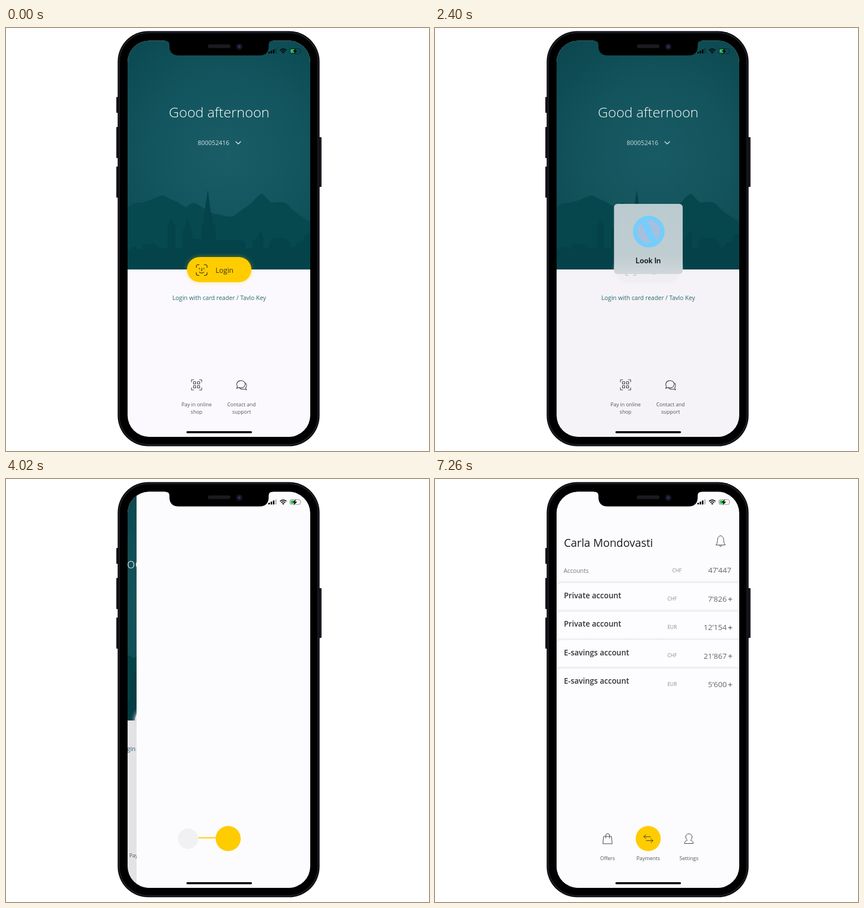
These frames come from a looping animation (748 px wide and 748 px high, 7.5 s). An HTML page:

```html
<!DOCTYPE html>
<html lang="en">
<head>
<meta charset="utf-8">
<title>Banking app login</title>
<style>
  html, body { margin: 0; width: 100%; height: 100%; overflow: hidden; background: #fff; }
  svg { display: block; width: 100vw; height: 100vh; }
  text { font-family: "Open Sans", "Noto Sans", sans-serif; }
  .mid { text-anchor: middle; }
  .end { text-anchor: end; }
  .line { fill: none; stroke: #444; stroke-linecap: round; stroke-linejoin: round; }
  .small { font-size: 9px; fill: #555; }
  .sum { font-size: 13.5px; fill: #666; }
  .cur { font-size: 8.7px; fill: #888; }
</style>
</head>
<body>
<svg viewBox="0 0 748 748" xmlns="http://www.w3.org/2000/svg">
  <defs>
    <clipPath id="screen"><rect x="215" y="22.500" width="323" height="700.500" rx="38"/></clipPath>
    <radialGradient id="sky" gradientUnits="userSpaceOnUse" cx="390" cy="225" r="270">
      <stop offset="0" stop-color="#1a5d66"/><stop offset=".5" stop-color="#13555e"/><stop offset="1" stop-color="#0a4850"/>
    </radialGradient>
    <linearGradient id="edge" x2="0" y2="1">
      <stop offset="0" stop-color="#dedddf" stop-opacity="0"/><stop offset="1" stop-color="#dedddf"/>
    </linearGradient>
    <linearGradient id="glass" x2="0" y2="1">
      <stop offset="0" stop-color="#bacbcf"/><stop offset=".75" stop-color="#bfcdd1"/><stop offset="1" stop-color="#d0d7da"/>
    </linearGradient>
    <filter id="blur" x="-20%" y="-40%" width="140%" height="180%"><feGaussianBlur stdDeviation="3.5"/></filter>
    <g id="face">
      <path d="M-9.5-4.5v-2a3 3 0 0 1 3-3h2M4.500-9.500h2a3 3 0 0 1 3 3v2M9.500 4.500v2a3 3 0 0 1-3 3h-2M-4.500 9.500h-2a3 3 0 0 1-3-3v-2"/>
      <path d="M-4-3.500v1.700M4-3.500v1.700M.4-3.500v4.300h-1.200M-4 3.600q4 3.600 8 0"/>
    </g>
  </defs>

  <g fill="#1d1d25">
    <rect x="195" y="122" width="5" height="28" rx="1"/>
    <rect x="195" y="175" width="5" height="55" rx="1"/>
    <rect x="195" y="245" width="5" height="55" rx="1"/>
    <rect x="552" y="193" width="6" height="88" rx="1"/>
  </g>
  <rect x="197.500" y="5.500" width="357" height="734" rx="54"/>
  <rect x="200" y="8" width="352" height="729" rx="51.500" fill="none" stroke="#1d1d26" stroke-width="2.500"/>

  <g clip-path="url(#screen)">
    <g id="login">
      <rect x="215" y="22" width="323" height="701" fill="#fbf9fd"/>
      <rect x="215" y="22" width="323" height="405" fill="url(#sky)"/>
      <path fill="#06494f" d="M215 318Q224 308 236 309Q246 308 258 303Q270 297 278 296Q288 302 300 306Q310 313 319 317Q327 309 333 309Q342 314 352 320Q366 330 378 330Q392 335 402 333Q416 322 435 309Q446 294 453 293Q461 301 469 309Q480 307 490 308Q498 310 504 319Q520 333 538 342V427H215Z"/>
      <path fill="#04434a" d="M215 391H222V387H231V391H240V386L248 381H262L270 387V390H286V348L289 345L292 338L295 345L299 348V390H312V361L316 352L321 337L326 352L330 361V373H345V350L349 345L352 318L357 286L361 318L366 345L371 350V375H418L424 380V389H436V378L445 371L450 357L455 371V389H466V379L473 372H494L503 380V388H510L516 378H524L528 366L538 363V427H215Z"/>
      <text class="mid" x="377" y="158" font-size="24.700" font-weight="350" fill="#fff">Good afternoon</text>
      <text x="339" y="207" font-size="10.900" fill="#d5e2e4">800052416</text>
      <path class="line" style="stroke:#e4eeee" stroke-width="1.300" d="M406.500 201l4.200 4 4.200-4"/>
      <rect id="glow" x="319" y="403.500" width="116" height="47" rx="23.500" filter="url(#blur)"/>
      <rect id="button" x="320" y="405" width="114" height="44.500" rx="22.200"/>
      <g id="label">
        <use href="#face" class="line" style="stroke:#3b3108" stroke-width="1.200" x="346" y="428"/>
        <text x="370.500" y="432.500" font-size="12.500" fill="#3b3420">Login</text>
      </g>
      <text class="mid" x="377" y="480.500" font-size="10.600" fill="#2b6a72">Login with card reader / Tavlo Key</text>
      <g class="line" stroke-width="1.100" transform="translate(337 631)">
        <path d="M-9-5v-4h4M5-9h4v4M9 5v4h-4M-5 9h-4v-4"/>
        <path d="M-5.500-5.500h4v4h-4ZM1.500-5.500h4v4h-4ZM-5.500 1.500h4v4h-4ZM1.500 1.500h4v4h-4Z"/>
      </g>
      <g class="line" stroke-width="1.100" transform="translate(417 631)">
        <path d="M-5.500 4.500L-9 6.500L-7.800 2.500A7.500 6.500 0 1 1-5.500 4.500Q-3 6 1 5"/>
        <path d="M7-3A7 6.500 0 0 1 6.500 5.500L8.500 8.800L3.500 7.500Q-1 8.800-4 5.800"/>
      </g>
      <g class="small mid">
        <text x="337" y="669">Pay in online</text><text x="337" y="682">shop</text>
        <text x="416.500" y="669">Contact and</text><text x="416.500" y="682">support</text>
      </g>
    </g>
    <rect id="dim" x="215" y="22" width="323" height="701"/>

    <g id="popup">
      <rect x="316.500" y="311" width="121.500" height="124" rx="6" fill="url(#glass)"/>
      <g fill="none" stroke="#76cdf9" stroke-linecap="round">
        <use id="scanFace" href="#face" transform="translate(378 360) scale(2.800)" stroke-width="1.200"/>
        <g id="rings" stroke-width="8">
          <circle cx="378" cy="360" r="24" fill="#a7bfde"/>
          <ellipse id="ring" cx="378" cy="360" ry="24"/>
        </g>
        <g id="tick" stroke-width="3.500">
          <circle cx="378" cy="360" r="26"/><path d="M366 361l8 8 16-18" stroke-linejoin="round"/>
        </g>
      </g>
      <text class="mid" x="377" y="416" style="font-family:Inter,sans-serif" font-size="12.800" font-weight="600" fill="#101416">Look In</text>
    </g>

    <g id="home">
      <rect x="215" y="22" width="324" height="701" fill="#fcfbfd"/>
      <g id="head">
        <text x="228" y="119.500" font-size="19.400" font-weight="400" fill="#1c1c1c">Carla Mondovasti</text>
        <path class="line" stroke-width="1" d="M497 116.500q2.500-2.500 2.500-8c0-5 2.500-8 5.500-8s5.500 3 5.500 8q0 5.500 2.500 8ZM503 117.500q2 4 4 0"/>
        <text x="227.500" y="166" font-size="10.400" fill="#777">Accounts</text>
        <text class="cur" x="419.500" y="165">CHF</text>
        <text class="sum end" x="524" y="166">47’447</text>
      </g>
      <g id="rows"></g>
      <g id="spots" stroke="#ffcc00" stroke-width="2">
        <circle id="spotL" cx="306" cy="636" r="18" fill="#f1f0f2" stroke="none"/>
        <circle id="spotR" cx="449" cy="636" fill="#f1f0f2" stroke="none"/>
        <path id="linkL"/><path id="linkR"/>
      </g>
      <circle cx="377" cy="635.800" r="22.200" fill="#ffcc00"/>
      <g id="nav">
        <g class="line" stroke-width="1">
          <path d="M298.500 632h13.500l1.300 13h-16.100ZM302 635v-5q0-3 3.300-3t3.300 3v5"/>
          <path d="M373 629l-4 3.500 4 3.500M369 632.500h12M381.500 636l4 3.500-4 3.500M385.500 639.500h-12"/>
          <path d="M449 627.500c-4 0-5.500 2.600-5.500 5.500 0 2.500 1.200 4.600 2.700 5.800-2.700.8-4.700 2.300-4.900 5.700h15.400c-.2-3.400-2.200-4.900-4.900-5.700 1.500-1.200 2.700-3.300 2.700-5.800 0-2.900-1.500-5.500-5.500-5.500Z"/>
        </g>
        <g class="small mid">
          <text x="305" y="674">Offers</text><text x="377" y="674">Payments</text><text x="449" y="674">Settings</text>
        </g>
      </g>
    </g>

    <g>
      <path d="M464 42h2.600v3h-2.600ZM468 40h2.600v5h-2.600ZM472 38h2.600v7h-2.600Z"/>
      <path d="M476 36h2.600v9h-2.600Z" opacity=".25"/>
      <path d="M484.500 39.500a8 8 0 0 1 11.400 0M486.700 41.800a5 5 0 0 1 7 0" fill="none" stroke="#000" stroke-width="1.700"/>
      <path d="M490.200 45.500l-2-2.200a3 3 0 0 1 4 0Z"/>
      <rect x="502" y="36.500" width="18.500" height="8.500" rx="2.500" fill="none" stroke="#000" stroke-opacity=".4"/>
      <path d="M521.800 39.200v3.200q1.200-1.600 0-3.200Z" opacity=".4"/>
      <rect x="503.300" y="37.800" width="8" height="6" rx="1.200" fill="#35c759"/>
      <path d="M512.800 36l-6.300 5.500h3.800l-1.500 4.500 6.200-5.800h-3.700Z"/>
    </g>
    <rect x="319" y="713" width="116" height="3.600" rx="1.800"/>
  </g>

  <path d="M281 20V22.500Q289 22.500 289 29V32Q289 48.500 305.500 48.500H448Q464.500 48.500 464.500 32V29Q464.500 22.500 472 22.500V20Z"/>
  <rect x="357" y="29" width="40" height="6.500" rx="3.200" fill="#1b1b1f"/>
  <circle cx="412.500" cy="33" r="5.500" fill="#141624"/>
  <circle cx="412.500" cy="33" r="2.300" fill="#2a3260"/>
</svg>
<script>
const LOOP = 7500, STEP = 60, WIDTH = 323;
const el = {};
document.querySelectorAll("svg [id]").forEach(n => el[n.id] = n);

const accounts = [
  ["Private account", "CHF", "7’826"],
  ["Private account", "EUR", "12’154"],
  ["E-savings account", "CHF", "21’867"],
  ["E-savings account", "EUR", "5’600"]
];
el.rows.innerHTML = accounts.map(([name, cur, sum], i) => {
  const y = 184 + i * 50.4;
  return `<g>
    <rect x="218" y="${y - 5}" width="320" height="8" fill="url(#edge)"/>
    <rect x="217" y="${y}" width="322" height="52" rx="5" fill="#fdfcfe"/>
    <text x="228" y="${y + 27}" font-size="13.5" font-weight="600" fill="#333">${name}</text>
    <text class="cur" x="411" y="${y + 30.5}">${cur}</text>
    <text class="sum end" x="516" y="${y + 33}">${sum}</text>
    <path d="M518.5 ${y + 28.5}h7M522 ${y + 25}v7" stroke="#555" stroke-width="1.1"/>
  </g>`;
}).join("");
const rows = [...el.rows.children];

const clamp = v => Math.min(1, Math.max(0, v));
const linear = (t, a, b) => clamp((t - a) / (b - a));
const easeOut = (t, a, b) => 1 - (1 - linear(t, a, b)) ** 3;
const mix = (a, b, k) => a + (b - a) * k;
const set = (node, name, value) => node.setAttribute(name, value);
const fade = (node, k) => set(node, "opacity", k);
const shift = (node, x, y) => set(node, "transform", `translate(${x} ${y})`);
const blend = (a, b, k) => `rgb(${a.map((v, i) => Math.round(mix(v, b[i], k)))})`;

function drawLogin(t, slide) {
  const press = linear(t, 600, 900);
  const fill = blend([255, 204, 0], [246, 244, 248], press);
  set(el.button, "fill", fill);
  set(el.glow, "fill", fill);
  fade(el.glow, mix(.3, .9, press));
  fade(el.label, mix(1, .28, press) + .14 * linear(t, 3000, 3400));
  shift(el.login, -.3 * WIDTH * slide, 0);
}

function drawPopup(t) {
  const show = linear(t, 1140, 1380) * (1 - linear(t, 3060, 3300));
  fade(el.popup, show);
  fade(el.scanFace, 1 - linear(t, 1860, 2040));
  const done = linear(t, 2700, 2880);
  fade(el.rings, linear(t, 1860, 2040) * (1 - done));
  fade(el.tick, done);
  const turn = (t - 2400) / 600 * Math.PI;
  set(el.ring, "rx", Math.abs(2 + 22 * Math.sin(turn)));
  set(el.ring, "transform", `rotate(${-26 + (t - 2400) * .12} 378 360)`);
  return show;
}

function drawHome(t, slide) {
  shift(el.home, WIDTH * (1 - slide), 0);
  fade(el.head, linear(t, 4380, 4620));
  rows.forEach((row, i) => {
    const k = easeOut(t, 4440 + i * 90, 4800 + i * 90);
    fade(row, k);
    shift(row, 0, 18 * (1 - k));
  });
  const right = easeOut(t, 4080, 4260), back = easeOut(t, 4320, 4500);
  set(el.spotR, "r", 18 * right);
  set(el.linkL, "d", `M${mix(324, 355, back)} 634.5H355`);
  set(el.linkR, "d", `M399 634.5H${mix(399, 431, right * (1 - back))}`);
  fade(el.spots, 1 - linear(t, 4380, 4560));
  fade(el.nav, linear(t, 4380, 4620));
}

function draw(time) {
  const t = Math.floor(time % LOOP / STEP) * STEP;
  const slide = easeOut(t, 3700, 4205);
  drawLogin(t, slide);
  const show = drawPopup(t);
  fade(el.dim, .025 * show + .1 * slide);
  drawHome(t, slide);
}

const start = performance.now();
function tick() {
  draw(performance.now() - start);
  requestAnimationFrame(tick);
}
tick();
</script>
</body>
</html>
```
